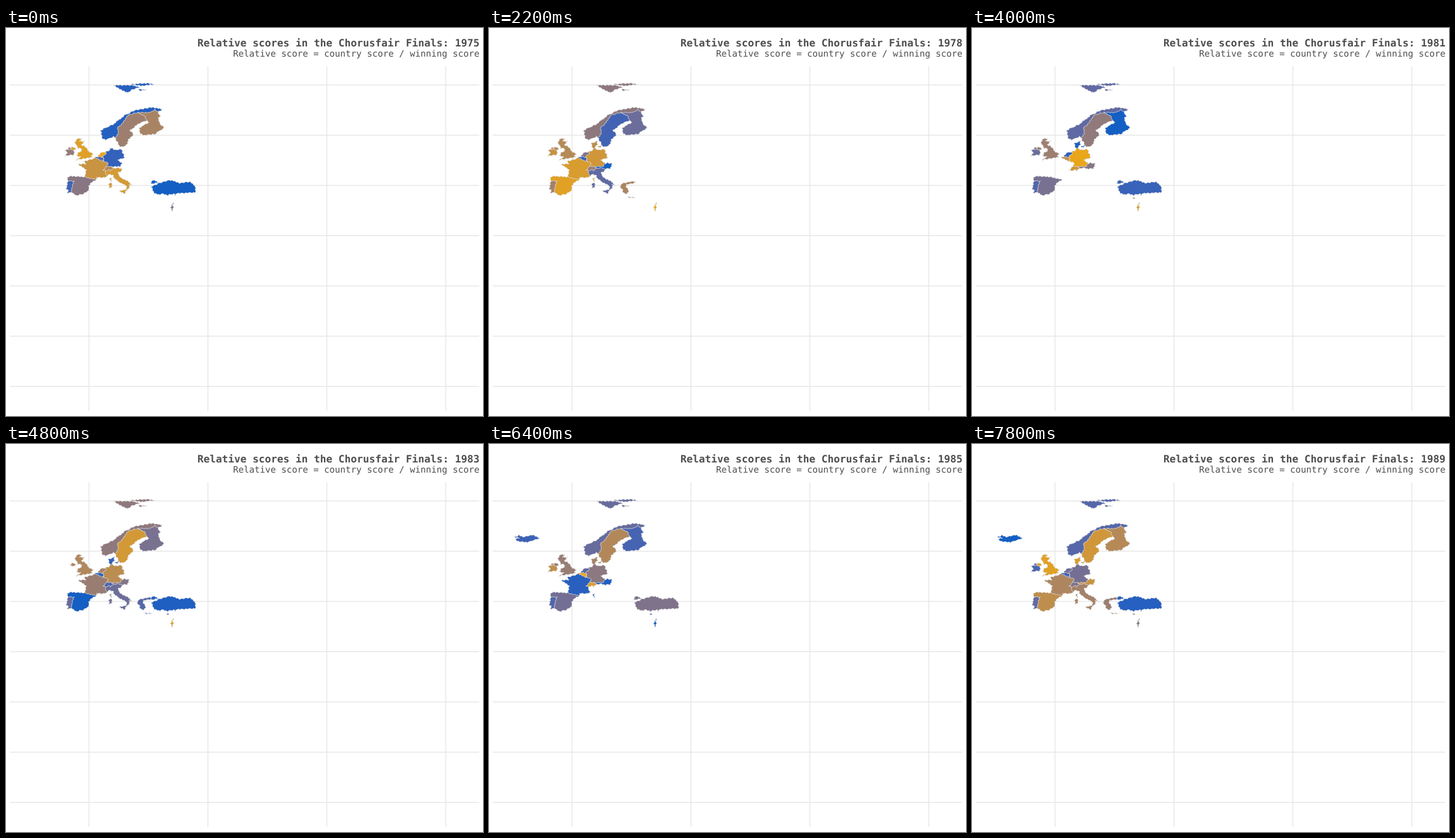
A matplotlib script for the animation above (8 s loop, 750x610 px).

```python
import numpy as np
import matplotlib.pyplot as plt
from matplotlib.animation import FuncAnimation
from matplotlib.patches import Polygon

plt.rcParams["text.hinting"] = "none"
plt.rcParams["text.hinting_factor"] = 32

W, H, DPI = 750, 610, 100
PX = 72 / DPI
FIRST_YEAR = 1975
FRAMES, INTERVAL = 40, 200
INK, GRID, BORDER = "#4D4D4D", "#E5E5E5", "#DCDCDC"
LOW = np.array([20, 95, 195]) / 255
HIGH = np.array([233, 166, 27]) / 255
CURVE = np.array([0.63, 1.15, 1])

fig = plt.figure(figsize=(W / DPI, H / DPI), dpi=DPI, facecolor="white")
ax = fig.add_axes([0, 0, 1, 1])
ax.set_xlim(0, W)
ax.set_ylim(H, 0)
ax.axis("off")


def shade(share):
    """Blue to amber; red rises early so the middle is a warm grey."""
    return LOW + (HIGH - LOW) * share ** CURVE


def arc(*coords):
    return np.reshape(coords, (-1, 2))


def rough(ring, step=0.3):
    """Split a ring into short steps and bend them by a field of position,
    so that neighbours keep a common border."""
    parts = []
    for a, b in zip(ring, np.roll(ring, -1, axis=0)):
        n = int(np.hypot(*(b - a)) / step) + 1
        parts.append(a + (b - a) * np.arange(n)[:, None] / n)
    lon, lat = np.concatenate(parts).T
    return (lon + 0.2 * np.sin(5 * lat + 2 * lon),
            lat + 0.15 * np.sin(4 * lon - 3 * lat))


regions = {}


def region(code, *arcs):
    lon, lat = rough(np.concatenate(arcs))
    xy = np.column_stack([130.5 + 3.74 * lon, 89.5 + 3.95 * (80 - lat)])
    patch = Polygon(xy, closed=True, ec=BORDER, lw=0.5 * PX,
                    joinstyle="round", zorder=2)
    ax.add_patch(patch)
    regions.setdefault(code, []).append(patch)


# ---------- common borders, a few lon, lat points each ----------
es_pt = arc(-8.9, 41.9, -6.3, 41.7, -7.1, 39.6, -7.4, 37.2)
fr_es = arc(-1.8, 43.4, 0.7, 42.7, 3.2, 42.4)
fr_it = arc(7.6, 43.8, 6.8, 45.2, 7, 45.9)
fr_ch = arc(7, 45.9, 6, 46.2, 7.5, 47.6)
fr_de = arc(7.5, 47.6, 8.1, 49, 6.3, 49.5)
fr_be = arc(5.8, 49.5, 4.9, 49.9, 2.5, 51.1)
be_nl = arc(3.4, 51.4, 5, 51.5, 6.1, 50.7)
nl_de = arc(6.1, 50.7, 6, 51.8, 7.1, 52.3, 7.1, 53.3)
ch_de = arc(7.5, 47.6, 9.6, 47.5)
ch_at = arc(9.6, 47.5, 10.4, 46.8)
ch_it = arc(7, 45.9, 8.4, 46.3, 9, 45.8, 10.4, 46.8)
at_it = arc(10.4, 46.8, 12.2, 47, 13.7, 46.5)
at_de = arc(9.6, 47.5, 13, 47.5, 13.8, 48.7)
ie_gb = arc(-6.2, 54, -8.1, 54.4, -7.2, 55.2)
no_se = arc(11, 58.9, 12.4, 61, 12, 63.2, 13.9, 64.4, 16.5, 68, 20.3, 69)
no_fi = arc(20.3, 69, 25.5, 69, 27.7, 70.2, 28.8, 69.2)
se_fi = arc(20.3, 69, 23.6, 67.5, 24.1, 65.8)

# ---------- countries: borders plus coast ----------
region("PT", es_pt, arc(-8.9, 37, -8.8, 38.3, -9.5, 38.7))
region("ES", fr_es, arc(0.6, 40.8, -0.3, 39.4, 0.1, 38.7, -0.7, 37.6, -2.1, 36.7,
                        -5.4, 36), es_pt[::-1], arc(-9.2, 43.2, -7.9, 43.7))
region("FR", fr_es, arc(3.1, 43.2, 6.5, 43.1), fr_it, fr_ch, fr_de, fr_be,
       arc(1.6, 50.5, -1.8, 49.6, -1.5, 48.6, -4.7, 48.4, -2.2, 47.1, -1.2, 46))
region("FR", arc(8.6, 42.4, 9.4, 43, 9.4, 41.4))
region("BE", fr_be, be_nl, arc(6.1, 50.2))
region("LU", arc(5.8, 49.5, 6.3, 49.5, 6.5, 49.8, 6.1, 50.2))
region("NL", be_nl, nl_de, arc(4.8, 53))
region("DE", fr_de, nl_de, arc(8.8, 54, 8.6, 54.9, 9.9, 54.8, 11, 54.1, 13.6, 54.5,
                               15, 51.1, 12.2, 50.2), at_de[::-1], ch_de[::-1])
region("CH", fr_ch, ch_de, ch_at, ch_it[::-1])
region("AT", at_de, arc(15, 49, 16.9, 48.6, 16.1, 46.8), at_it[::-1], ch_at[::-1])
region("IT", fr_it, ch_it, at_it,
       arc(13.6, 45.6, 12.4, 45.2, 12.4, 44.2, 14.1, 42.6, 16, 41.8, 18.5, 39.9,
           16.9, 40.5, 17, 39, 15.8, 38, 15.7, 40, 12.9, 41.2, 10.5, 42.8,
           10.2, 43.9, 8.8, 44.4))
region("IT", arc(12.5, 37.8, 15.6, 38.3, 15.1, 36.7))
region("IT", arc(8.3, 40.9, 9.6, 41, 9.6, 39.2, 8.5, 39))
region("GB", arc(-3, 58.6, -4, 57.6, -1.9, 57.6, -3.1, 56, -1.9, 55.8, 0.2, 53.3,
                 1.7, 52.6, 0.9, 51.7, 1.4, 51.2, -3, 50.6, -5.7, 50.1, -3.2, 51.4,
                 -5.2, 51.8, -4.5, 53.3, -3, 53.5, -3.3, 54.8, -4.9, 54.8,
                 -4.8, 55.8, -6.1, 56.7, -5.1, 58.6))
region("GB", ie_gb, arc(-6, 55.2, -5.5, 54.5))
region("IE", ie_gb, arc(-8.6, 55, -8.5, 54.3, -10, 54.1, -9.2, 53, -10.2, 51.7,
                        -6.4, 52.2))
region("DK", arc(8.6, 54.9, 8.1, 56.6, 10.6, 57.7, 10.7, 56.4, 9.6, 55.4, 9.9, 54.8))
region("DK", arc(11, 55.6, 12.5, 56.1, 12.1, 54.9))
region("NO", no_se, no_fi, arc(31, 70.4, 26, 71.1, 19, 69.8, 14.8, 67.8, 10.5, 64.5,
                               5, 62, 5.6, 58.7, 7, 58.1, 10.4, 59.5))
region("NO", arc(10.5, 79.9, 18, 79.9, 21.5, 79.1, 18.5, 78.2, 16, 76.9, 14, 77.7))
region("NO", arc(17.3, 80.3, 24.5, 80.7, 27.4, 80.2, 22, 79.6))
region("NO", arc(20.8, 78.3, 24.5, 78, 21.5, 77.7))
region("SE", no_se, se_fi, arc(21.3, 64.8, 17.3, 62, 18.8, 60, 16.6, 58.5, 16, 56.2,
                               14.1, 55.4, 12.9, 55.4))
region("FI", no_fi, arc(30, 67.7, 29.1, 66.9, 29.7, 64.8, 31.5, 62.9, 27.8, 60.5,
                        23, 59.9, 21.3, 60.8, 21.3, 63, 25.3, 65.2), se_fi[::-1])
region("IS", arc(-24.3, 65.6, -22.2, 66.4, -20.5, 65.7, -16.2, 66.5, -13.6, 65.2,
                 -18.7, 63.5, -22.6, 63.9, -24, 64.9, -22, 65.3))
region("GR", arc(26.6, 41.6, 26.1, 40.8, 22.7, 40.4, 23, 39, 24, 37.8, 23.1, 36.5,
                 21.7, 36.9, 21.2, 38.3, 20.2, 39.6, 21, 40.8, 24.5, 41.5))
region("GR", arc(23.5, 35.5, 26.3, 35.2, 24.5, 35))
region("TR", arc(26.2, 41.7, 26.1, 40.6, 29, 41.2, 27.5, 42))
region("TR", arc(26.2, 39.5, 29.1, 40.8, 33.5, 42, 35.2, 42, 38.3, 40.9, 42.3, 41.5,
                 44.8, 39.6, 44.7, 37.2, 36.7, 36.8, 36, 36, 35.8, 36.7, 32.7, 36.1,
                 30.6, 36.8, 29.7, 36.2, 27.3, 36.9))
region("CY", arc(32.3, 35, 34, 35.2, 32.9, 34.6))
region("IL", arc(35.2, 33.1, 35.8, 33.3, 35.1, 32.1, 35.4, 31.2, 34.9, 29.6,
                 34.3, 31.3))
region("MA", arc(-5.6, 35.9, -2.1, 35.1, -1.2, 32.4, -3.6, 31, -8.7, 28.8, -8.7, 27.5,
                 -11.5, 26.5, -14.5, 21.5, -17, 21.4, -13.5, 27.4, -9.8, 29.7,
                 -9.4, 31.8, -7, 34.2))

# ---------- final order of each year, with the steepness of its scores ----------
SEASONS = [
    (1.4, "NL GB IT FR LU CH FI SE IE ES IL MT YU MC BE PT DE NO TR"),
    (1.8, "GB FR MC CH AT IL IT BE NL DE IE FI PT GR LU ES YU NO"),
    (1.4, "FR GB IE MC GR CH BE DE ES FI IL NL IT PT NO LU AT SE"),
    (1.5, "IL BE FR MC IE DE LU GR ES CH GB IT NL SE AT DK PT TR FI NO"),
    (1.1, "IL ES FR DE IE DK GB GR PT CH NO NL LU FI IT MC SE BE AT"),
    (1.5, "IE DE GB CH NL IT PT AT LU SE FR ES GR DK TR NO BE MA FI"),
    (1.4, "GB DE FR CH IE CY IL GR NL SE DK LU BE ES YU FI AT TR PT NO"),
    (1.6, "DE IL CH BE CY LU GB SE AT ES IE NO PT YU TR NL DK FI"),
    (1.6, "LU IL SE YU DE GB NL FR NO AT FI IT PT GR CH CY DK BE TR ES"),
    (1.7, "SE IE ES DK BE IT GB FR FI LU PT TR NL CY CH NO DE YU AT"),
    (1.1, "NO DE SE GB IL IE IT AT FI FR DK CH LU TR ES CY GR PT BE"),
    (2.0, "BE CH LU IE SE DK GB DE TR ES NO NL PT FI IS YU FR AT IL CY"),
    (1.7, "IE DE IT YU NL DK CY IL NO GR BE SE GB FR FI IS CH PT ES AT LU TR"),
    (1.3, "CH GB DK LU NO YU IL IE NL FR ES SE IT DE TR IS GR PT BE FI AT"),
    (1.3, "YU GB DK SE AT ES FI FR IT GR CY IL CH DE NL PT NO IE BE LU TR IS"),
]


def season_colors(steepness, order):
    codes = order.split()
    shares = np.linspace(1, 0, len(codes)) ** steepness
    return {code: shade(share) for code, share in zip(codes, shares)}


seasons = [season_colors(*s) for s in SEASONS]

# ---------- grid and titles ----------
grid = dict(color=GRID, lw=1.3 * PX, snap=False, solid_capstyle="butt", zorder=1)
for k in range(4):
    ax.plot([130.5 + 187 * k] * 2, [60, 602], **grid)
for k in range(7):
    ax.plot([6, 744], [89.5 + 79 * k] * 2, **grid)

mono = dict(family="DejaVu Sans Mono", color=INK, ha="right", va="baseline")
title = ax.text(744, 29, "", size=16 * PX, weight="bold", **mono)
ax.text(744, 45, "Relative score = country score / winning score",
        size=14 * PX, **mono)


def year_index(frame):
    """Three frames per year, two per year from the twelfth on."""
    return frame // 3 if frame < 33 else 11 + (frame - 33) // 2


def update(frame):
    # The map runs one frame ahead of the title.
    colors = seasons[year_index(frame + 1)]
    for code, patches in regions.items():
        for patch in patches:
            patch.set_visible(code in colors)
            if code in colors:
                patch.set_facecolor(colors[code])
    year = FIRST_YEAR + year_index(frame)
    title.set_text(f"Relative scores in the Chorusfair Finals: {year}")
    return []


anim = FuncAnimation(fig, update, frames=FRAMES, interval=INTERVAL,
                     init_func=lambda: update(0), repeat=True, repeat_delay=0)
plt.show()
```
